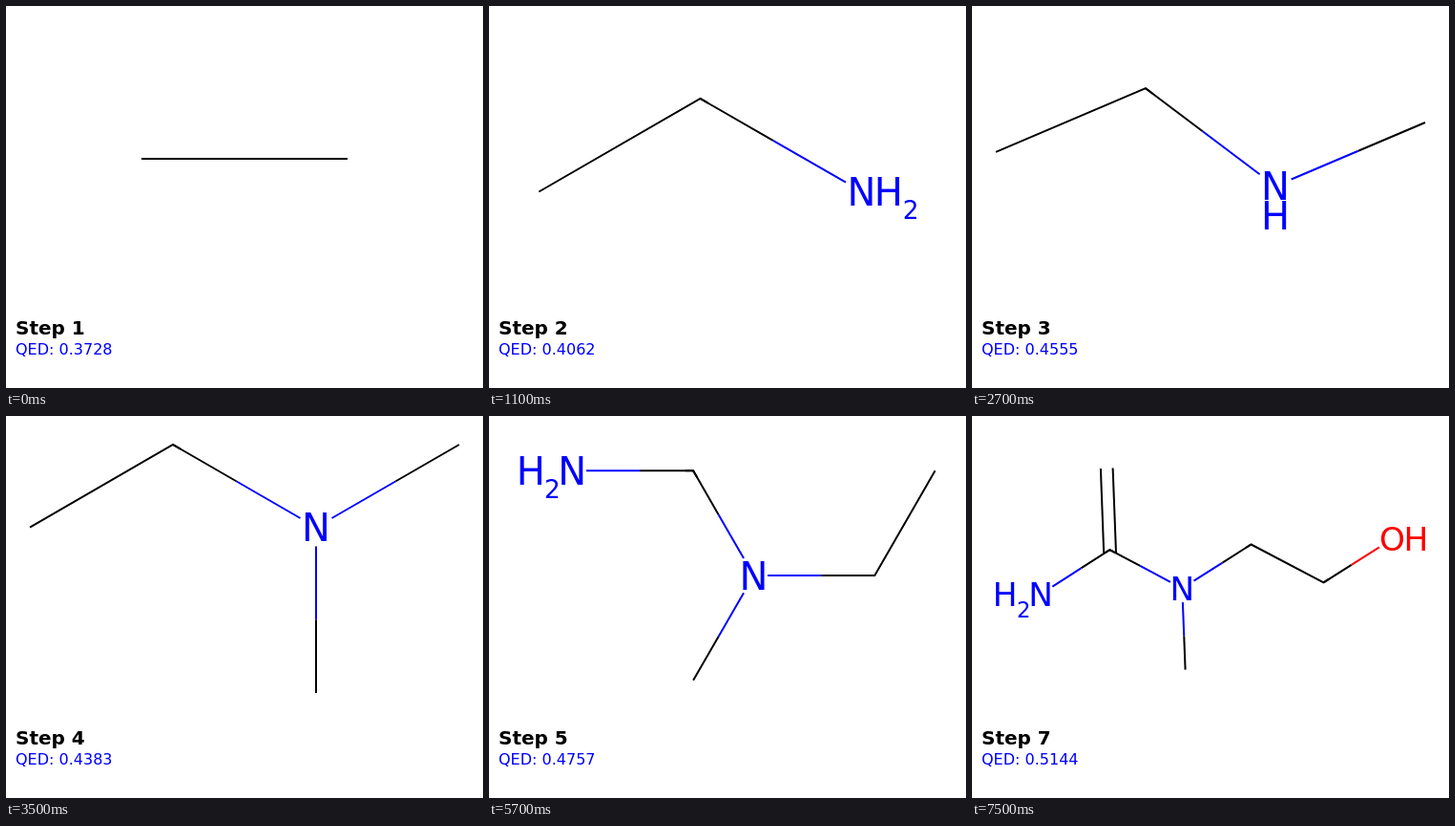
An HTML page with a canvas that plays this animation: 500x400 px, repeating every 8000 ms.

```html
<!DOCTYPE html>
<html lang="en">
<head>
<meta charset="utf-8">
<title>Molecule steps</title>
<style>
html, body { margin: 0; width: 100%; height: 100%; overflow: hidden; background: #fff; }
canvas { display: block; }
</style>
</head>
<body>
<canvas id="stage" width="500" height="400"></canvas>
<script>
const ctx = document.getElementById('stage').getContext('2d');
const FONT = '"DejaVu Sans", Verdana, sans-serif';
const BLACK = '#000', BLUE = '#00f', RED = '#f00';
const LOOP = 8000;

function line(color, ...pts) {
  ctx.strokeStyle = color;
  ctx.beginPath();
  for (let i = 0; i < pts.length; i += 2) ctx.lineTo(pts[i], pts[i + 1]);
  ctx.stroke();
}

// Bond from a carbon to a labelled atom: the far half takes the atom's colour.
function bond(x1, y1, x2, y2, color = BLUE) {
  const mx = (x1 + x2) / 2, my = (y1 + y2) / 2;
  line(BLACK, x1, y1, mx, my);
  line(color, mx, my, x2, y2);
}

function text(str, x, base, size, color, align = 'left', weight = '') {
  ctx.font = `${weight} ${size}px ${FONT}`;
  ctx.textAlign = align;
  ctx.fillStyle = color;
  ctx.fillText(str, x, base);
}

// Capital letter centred on a point.
function atom(ch, x, y, size = 40, color = BLUE) {
  text(ch, x, y + 0.3645 * size, size, color, 'center');
}

function sub2(x, y, size = 40) {
  text('2', x + 0.008 * size, y + 0.702 * size, 0.66 * size, BLUE, 'center');
}

function amineLeft(x, y, size = 40) {
  atom('H', x - 1.09 * size, y, size);
  sub2(x - 0.53 * size, y, size);
  atom('N', x, y, size);
}

const steps = [
  { at: 0, qed: '0.3728', draw() {
    line(BLACK, 142, 160, 358, 160);
  } },
  { at: 500, qed: '0.4062', draw() {
    line(BLACK, 52.3, 194.5, 221.5, 97, 230, 101.9);
    bond(221.5, 97, 374, 184.7);
    atom('N', 390.5, 194.7);
    atom('H', 418.9, 194.7);
    sub2(441.9, 194.7);
  } },
  { at: 1500, qed: '0.4555', draw() {
    line(BLACK, 25, 152.8, 182, 86.2, 190, 92.2);
    bond(182, 86.2, 301.6, 176.2);
    bond(475, 122, 334.7, 181.5);
    atom('N', 318, 188.7);
    atom('H', 318, 219.7);
  } },
  { at: 3500, qed: '0.4383', draw() {
    line(BLACK, 25, 116.6, 175, 30, 183, 34.6);
    bond(175, 30, 308.5, 107);
    bond(475, 30, 341.5, 107);
    bond(325, 290, 325, 136.5);
    atom('N', 325, 116.7);
  } },
  { at: 4500, qed: '0.4757', draw() {
    line(BLACK, 206, 57.3, 214.1, 57.3, 218.1, 64.2);
    bond(214.1, 57.3, 102, 57.3);
    bond(214.1, 57.3, 267, 149);
    bond(214.1, 276.8, 267, 185.2);
    bond(404.3, 167, 292, 167);
    line(BLACK, 396, 167, 404.3, 167, 467.6, 57.3);
    amineLeft(87.3, 57.5);
    atom('N', 277.5, 167.2);
  } },
  { at: 6500, qed: '0.5428', draw() {
    line(BLACK, 135, 34, 160.6, 150.6);
    line(BLACK, 151.5, 30.2, 177, 146.7);
    line(BLACK, 162, 149.5, 168, 144, 176, 146.5);
    bond(168, 144, 98.5, 208);
    bond(168, 144, 262.5, 173.7);
    bond(361.6, 100.4, 292, 164.5);
    bond(302.4, 290, 281.5, 196.3);
    line(BLACK, 355.7, 105.8, 361.6, 100.4, 470.7, 134.5);
    amineLeft(84.3, 221.5);
    atom('N', 277.3, 178.5);
  } },
  { at: 7500, qed: '0.5144', draw() {
    const size = 34.3;
    line(BLACK, 134.9, 55, 138.2, 144);
    line(BLACK, 147.6, 54.5, 151, 143.6);
    line(BLACK, 139, 143.5, 144.4, 140.1, 150, 143.1);
    bond(144.4, 140.1, 84.3, 178.6);
    bond(144.4, 140.1, 208, 173.8);
    bond(292.6, 134.5, 232.5, 172.6);
    bond(368.5, 174.3, 427, 137.3, RED);
    bond(223.6, 265.6, 220.9, 195);
    line(BLACK, 287, 138, 292.6, 134.5, 368.5, 174.3, 374, 170.8);
    amineLeft(72, 186.5, size);
    atom('N', 220.3, 180.3, size);
    atom('O', 440.6, 128.8, size, RED);
    atom('H', 465.4, 128.8, size, RED);
  } }
];

ctx.lineWidth = 2;
ctx.lineJoin = 'miter';
let shown = -1;

function render(now) {
  const t = now % LOOP;
  const i = steps.findLastIndex(s => s.at <= t);
  if (i !== shown) {
    shown = i;
    ctx.fillStyle = '#fff';
    ctx.fillRect(0, 0, 500, 400);
    steps[i].draw();
    text(`Step ${i + 1}`, 10, 344, 20, BLACK, 'left', 'bold');
    text(`QED: ${steps[i].qed}`, 10, 365, 16, BLUE);
  }
}

const start = performance.now();
function tick() {
  render(performance.now() - start);
  requestAnimationFrame(tick);
}
tick();
</script>
</body>
</html>
```
